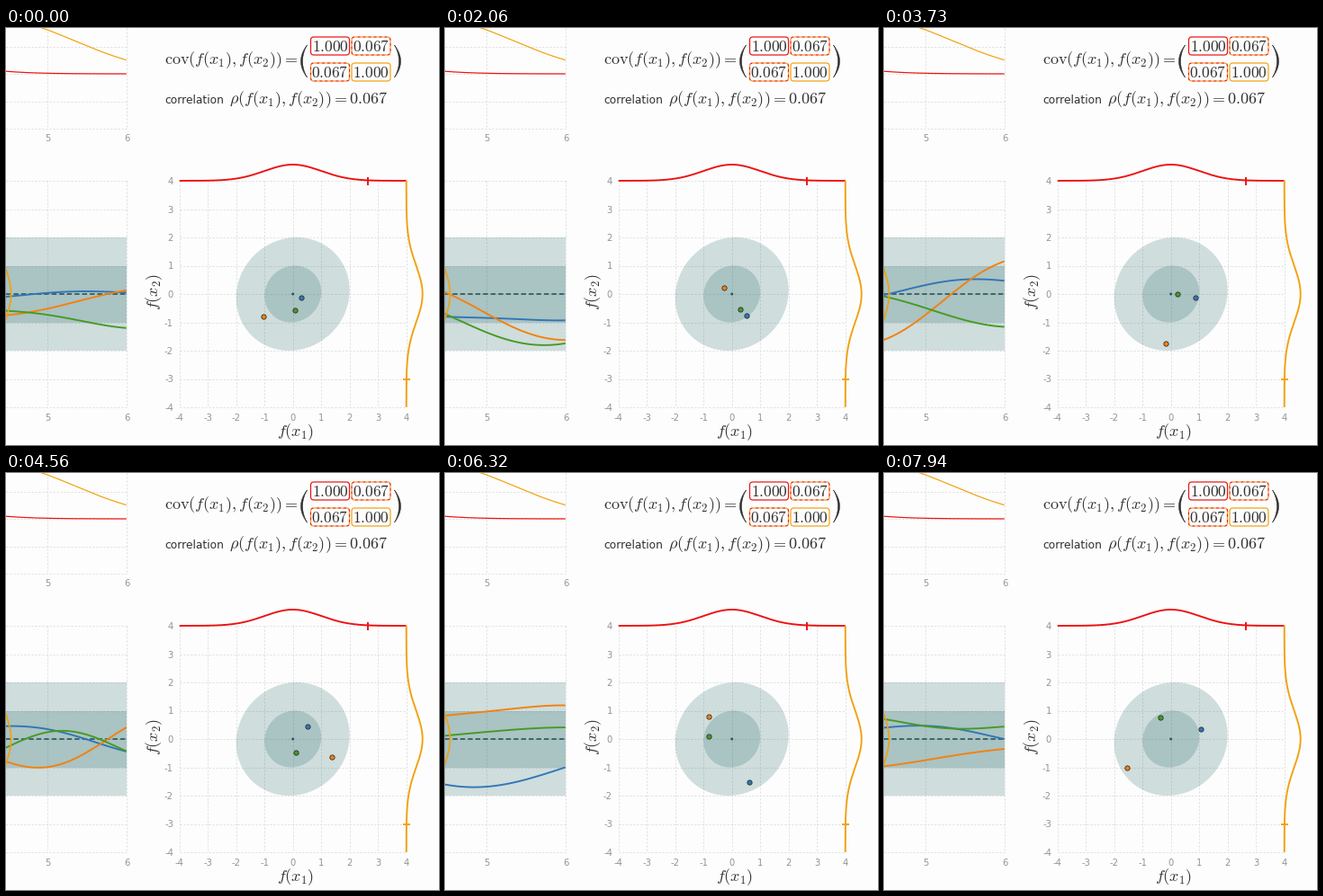
A matplotlib script for the animation above (8000 ms loop, 481 by 464 pixels).

```python
import numpy as np
import matplotlib.pyplot as plt
from matplotlib.animation import FuncAnimation
from matplotlib.patches import Circle, FancyBboxPatch, Polygon, Rectangle

W, H, DPI = 481, 464, 64
PX = 72 / DPI                       # points per pixel
FRAMES, STEP = 80, 100

BG, GRID, LABEL, INK = "#fdfdfd", "#dcdfdf", "#949494", "#303030"
RED, AMBER, TEAL = "#ee1010", "#f2a10f", (25 / 255, 95 / 255, 95 / 255)
BLUE, ORANGE, GREEN = "#3076b5", "#f3810c", "#449b22"

UNIT = 31.5                         # pixels per unit of f
X0, Y0 = 318.7, 296                 # where f(x1) = 0 and f(x2) = 0
LEFT, RIGHT = X0 - 4 * UNIT, X0 + 4 * UNIT
TOP, BOTTOM = Y0 - 4 * UNIT, Y0 + 4 * UNIT
EDGE = 133.7                        # right end of the left-hand panels, x = 6
X1, X2, RHO = 2, 4.34, 0.067

plt.rcParams["mathtext.fontset"] = "cm"
plt.rcParams["font.family"] = "DejaVu Sans"

fig = plt.figure(figsize=(W / DPI, H / DPI), dpi=DPI, facecolor=BG)
ax = fig.add_axes([0, 0, 1, 1])
ax.set_xlim(0, W)
ax.set_ylim(H, 0)
ax.axis("off")


def bell(v):
    return np.exp(-v ** 2 / 2)


def kernel(a, b, scale):
    return bell(np.subtract.outer(a, b) / scale)


def column(x):
    return EDGE + 88 * (x - 6)


def line(x, y, color, width, z=3, **kw):
    kw.setdefault("solid_capstyle", "butt")
    return ax.plot(x, y, color=color, lw=width * PX, zorder=z, **kw)[0]


def grid(xs, ys, x_span, y_span):
    style = dict(ls=(0, (2, 2)), dash_capstyle="butt")
    for x in xs:
        line([x, x], y_span, GRID, 1, 1, **style)
    for y in ys:
        line(x_span, [y, y], GRID, 1, 1, **style)


def text(x, y, s, size, color=INK, **kw):
    ax.text(x, y, s, fontsize=size * PX, color=color, zorder=6, **kw)


def label(x, y, s, ha="center"):
    text(x, y, s, 10, LABEL, ha=ha, va="center_baseline")


def draw_panels():
    cells = UNIT * np.arange(9)
    years = column(np.array([5, 6]))
    grid(years, 112 - 30.5 * np.arange(4), [0, EDGE], [0, 112])
    grid(years, TOP + cells, [0, EDGE], [TOP, BOTTOM])
    grid(LEFT + cells, TOP + cells, [LEFT, RIGHT], [TOP, BOTTOM])
    for y in (122, 433):
        for x in (5, 6):
            label(column(x) + 0.5, y, str(x))
    for k in range(-4, 5):
        label(186, Y0 - UNIT * k, str(k), "right")
        label(X0 + UNIT * k, 433, str(k))


def draw_kernels():
    x = np.linspace(4.4, 6, 150)
    for center, color in ((X2, AMBER), (X1, RED)):
        line(column(x), 51 - 61 * bell(x - center), color, 1.2)


def draw_spread():
    a = np.linspace(0, 2 * np.pi, 200)
    u, v = np.cos(a), RHO * np.cos(a) + np.sqrt(1 - RHO ** 2) * np.sin(a)
    for k in (2, 1):
        r = k * UNIT
        style = dict(fc=TEAL, alpha=0.2, lw=0, zorder=2)
        ax.add_patch(Rectangle((-2, Y0 - r), EDGE + 2.5, 2 * r, **style))
        ax.add_patch(Polygon(np.c_[X0 + r * u, Y0 - r * v], **style))
    line([0, EDGE], [Y0, Y0], "#315f61", 1.8, ls=(0, (3, 1.7)),
         dash_capstyle="butt")
    ax.add_patch(Circle((X0, Y0), 1.5, fc="#2c5a60", lw=0, zorder=3))


def draw_densities():
    v = np.linspace(-4, 4, 161)
    line(X0 + UNIT * v, TOP - 18 * bell(v), RED, 1.9)
    line(RIGHT + 18 * bell(v), Y0 - UNIT * v, AMBER, 1.9)
    line(column(X2) + 18 * bell(v), Y0 - UNIT * v, AMBER, 1.7, 5)
    line([401.5, 401.5], [166, 175], RED, 1.9)
    line([RIGHT - 4, RIGHT + 4], [391, 391], AMBER, 1.9)


def paren(x, bend):
    s = np.linspace(0, 1, 30)
    y = 19 + 36 * s
    bow = 4 * s * (1 - s)
    outer, inner = x - bend * bow, x - (bend - np.sign(bend) * 2) * bow
    ax.add_patch(Polygon(np.r_[np.c_[outer, y], np.c_[inner, y][::-1]],
                         fc=INK, ec=INK, lw=0.5 * PX, zorder=6))


def entry(x, y, s, *edges):
    """A boxed matrix entry; two edge colours alternate as dashes."""
    for i, color in enumerate(edges):
        dashes = (2.5 * i, (2.5, 2.5)) if len(edges) > 1 else (0, None)
        ax.add_patch(FancyBboxPatch(
            (x - 21.5, y - 10), 43, 20, fc="none", ec=color, lw=1.2 * PX,
            boxstyle="round,pad=0,rounding_size=3.5", ls=dashes, zorder=5))
    text(x, y + 6, f"${s}$", 17.4, ha="center", va="baseline")


def draw_formulas():
    pair = r"(f(x_1), f(x_2))"
    text(176, 39.7, rf"$\mathrm{{cov}}{pair} =$", 18.1, va="baseline")
    text(176.3, 84, "correlation", 12.3, va="baseline")
    text(247.5, 84, rf"$\rho{pair} = 0.067$", 18.1, va="baseline")
    paren(334.5, 7)
    paren(431.5, -7)
    entry(360, 20, "1.000", RED)
    entry(405.5, 20, "0.067", AMBER, RED)
    entry(360, 49, "0.067", AMBER, RED)
    entry(405.5, 49, "1.000", AMBER)
    text(321.2, 454, "$f(x_1)$", 18.1, ha="center", va="baseline")
    text(164.5, 293.5, "$f(x_2)$", 18.1, ha="center", va="center",
         rotation=90)


# Key poses by second: blue, orange and green, each f at the four NODES.
NODES = np.array([X1, X2, 5.17, 6])
POSES = {
    0.0: [(.29, -.13, .07, .05), (-1.05, -.78, -.41, .13), (.06, -.57, -.81, -1.2)],
    1.2: [(-.57, .27, .58, .10), (.75, .11, -.20, -.06), (.25, -1.63, -1.38, -.41)],
    2.9: [(-.14, .06, -.44, -.82), (-.2, -.90, -.54, -.49), (-.2, 1.42, .57, .50)],
    4.5: [(.52, .44, .25, -.44), (1.36, -.63, -.89, .41), (.12, -.49, .29, -.43)],
    5.6: [(.52, -.10, .37, .02), (-1.33, -.10, .10, .35), (.22, -.44, -.30, -.35)],
    6.3: [(.60, -1.52, -1.63, -1.0), (-.82, .78, 1.02, 1.19), (-.81, .08, .29, .41)],
    7.9: [(1.05, .36, .44, .00), (-1.54, -1.0, -.67, -.35), (-.38, .76, .40, .44)],
}
KEYS = np.array(list(POSES))
TIMES = np.arange(FRAMES) * STEP / 1000
PACE = 0.5                          # seconds over which a sample stays similar

CURVE_X = np.linspace(X2, 6, 120)
COV = kernel(NODES, NODES, 1)
BASIS = kernel(CURVE_X, NODES, 1) @ np.linalg.inv(COV)

rng = np.random.default_rng(8)


def wander(poses, waves=40):
    """Smooth random path of a Gaussian process through the key poses."""
    freq = rng.normal(0, 1 / PACE, (len(NODES), waves))
    phase = rng.uniform(0, 2 * np.pi, freq.shape)
    mix = np.linalg.cholesky(COV).T

    def free(t):
        swing = np.cos(t[:, None, None] * freq + phase).sum(-1)
        return np.sqrt(2 / waves) * swing @ mix

    pull = np.linalg.solve(kernel(KEYS, KEYS, PACE), poses - free(KEYS))
    return free(TIMES) + kernel(TIMES, KEYS, PACE) @ pull


class Sample:
    """A random function on the left and its dot on the right."""

    def __init__(self, index, color):
        z = 4 + index / 10
        self.path = wander(np.array([p[index] for p in POSES.values()]))
        self.curve = line([], [], color, 1.9, z)
        self.dot = ax.plot([], [], "o", ms=5.3 * PX, mfc=color, mec="#2b2b2b",
                           mew=0.8 * PX, zorder=z + 2)[0]

    def show(self, k):
        f = self.path[k]
        self.curve.set_data(column(CURVE_X), Y0 - UNIT * (BASIS @ f))
        self.dot.set_data([X0 + UNIT * f[0]], [Y0 - UNIT * f[1]])
        return [self.curve, self.dot]


draw_panels()
draw_kernels()
draw_spread()
draw_densities()
draw_formulas()
samples = [Sample(i, c) for i, c in enumerate((BLUE, ORANGE, GREEN))]


def update(k):
    return [artist for s in samples for artist in s.show(k)]


anim = FuncAnimation(fig, update, frames=FRAMES, interval=STEP,
                     init_func=lambda: update(0), repeat=True, repeat_delay=0)
plt.show()
```
